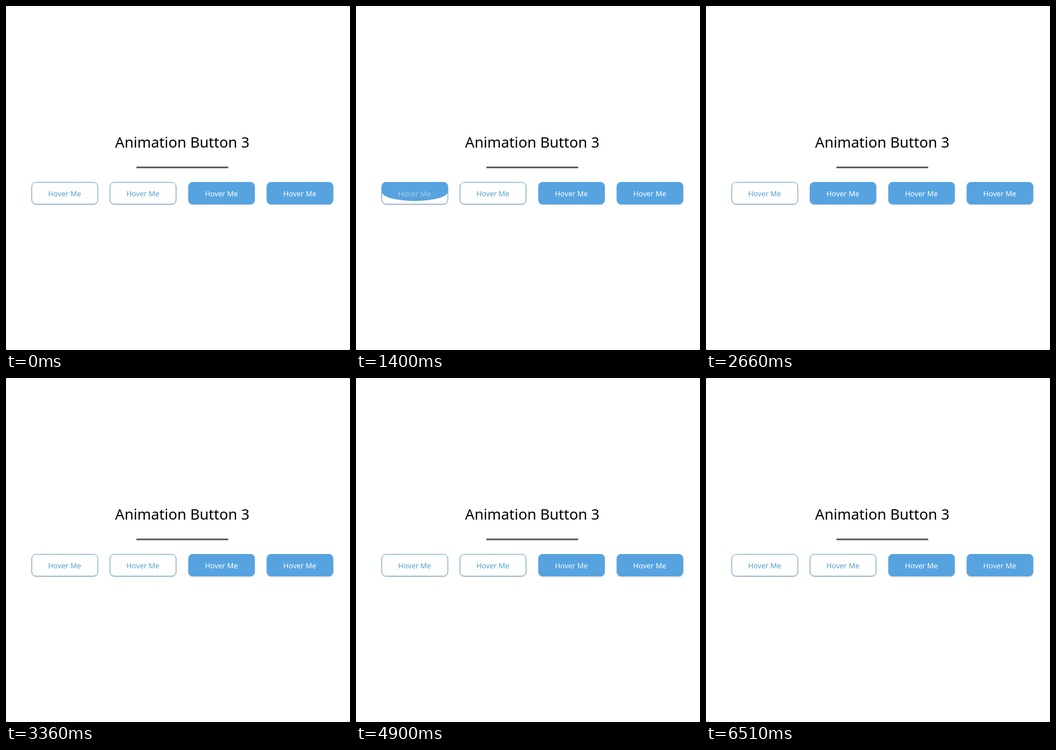
These frames come from a looping animation (600x600 px, 6.58 s). An HTML page:

```html
<!DOCTYPE html>
<html lang="en">
<head>
<meta charset="utf-8">
<title>Animation Button 3</title>
<style>
  html, body { margin: 0; width: 100%; height: 100%; overflow: hidden; background: #8c8c8c; }
  svg { display: block; width: 600px; height: 600px; background: #fff; border-radius: 3px; }
  text { font-family: "Noto Sans", "Open Sans", sans-serif; text-anchor: middle; }
  .title { font-size: 25.6px; font-weight: 500; }
  .label { font-size: 12.7px; }
  .frame { fill: #fff; stroke: #67a0c2; filter: drop-shadow(0 1px 1px rgba(0, 0, 0, .2)); }
  .wave { fill: #56a3e0; }
</style>
</head>
<body>
<svg id="stage" viewBox="0 0 600 600">
  <text class="title" x="307.5" y="247">Animation Button 3</text>
  <rect x="227.5" y="280" width="160" height="3" fill="#615f62"/>
</svg>
<script>
const LOOP = 6580, STEP = 70, DURATION = 700;
const WIDTH = 116, TOP = 307, BOTTOM = 346, FULL = 68;
const BLUE = [84, 160, 203];
const stage = document.getElementById('stage');

const buttons = [
  { x: 44.5, fromTop: true, filled: false, enter: 285, leave: 1190 },
  { x: 181, fromTop: false, filled: false, enter: 1980, leave: 2735 },
  { x: 318, fromTop: true, filled: true, enter: 3515, leave: 4425 },
  { x: 454.7, fromTop: false, filled: true, enter: 5117, leave: 6040 }
];

function add(parent, tag, attributes) {
  const node = document.createElementNS('http://www.w3.org/2000/svg', tag);
  for (const name in attributes) node.setAttribute(name, attributes[name]);
  return parent.appendChild(node);
}

buttons.forEach((button, i) => {
  const box = { x: button.x, y: TOP, width: WIDTH, height: BOTTOM - TOP, rx: 8 };
  const clip = add(stage, 'clipPath', { id: 'clip' + i });
  add(clip, 'rect', box);
  add(stage, 'rect', {
    ...box, class: 'frame', x: box.x + .5, y: TOP + .5,
    width: WIDTH - 1, height: box.height - 1, rx: 7.5
  });
  button.wave = add(stage, 'path', { class: 'wave', 'clip-path': `url(#clip${i})` });
  button.label = add(stage, 'text', { class: 'label', x: button.x + WIDTH / 2 - .3, y: 332 });
  button.label.textContent = 'Hover Me';
});

// CSS "ease": cubic-bezier(.25, .1, .25, 1)
function ease(x) {
  if (x <= 0) return 0;
  if (x >= 1) return 1;
  const bezier = (s, a, b) => 3 * (1 - s) ** 2 * s * a + 3 * (1 - s) * s * s * b + s ** 3;
  let low = 0, high = 1;
  for (let i = 0; i < 24; i++) {
    const middle = (low + high) / 2;
    if (bezier(middle, .25, .25) < x) low = middle; else high = middle;
  }
  return bezier(low, .1, 1);
}

// A block growing from one edge, its leading corners rounded by 50%.
function wavePath({ x, fromTop }, height) {
  if (height < .2) return '';
  const base = fromTop ? TOP : BOTTOM;
  const direction = fromTop ? 1 : -1;
  const shoulder = base + direction * height / 2;
  return `M${x} ${base}V${shoulder}A${WIDTH / 2} ${height / 2} 0 0 ${fromTop ? 0 : 1} ` +
    `${x + WIDTH} ${shoulder}V${base}Z`;
}

function draw(time) {
  for (const button of buttons) {
    const hover = time < button.leave
      ? ease((time - button.enter) / DURATION)
      : 1 - ease((time - button.leave) / DURATION);
    const level = button.filled ? 1 - hover : hover;
    const color = BLUE.map(c => Math.round(c + (255 - c) * level));
    button.wave.setAttribute('d', wavePath(button, level * FULL));
    button.label.setAttribute('fill', `rgb(${color})`);
  }
}

function tick() {
  const time = performance.now() % LOOP;
  draw(Math.floor(time / STEP) * STEP);
  requestAnimationFrame(tick);
}
tick();
</script>
</body>
</html>
```
